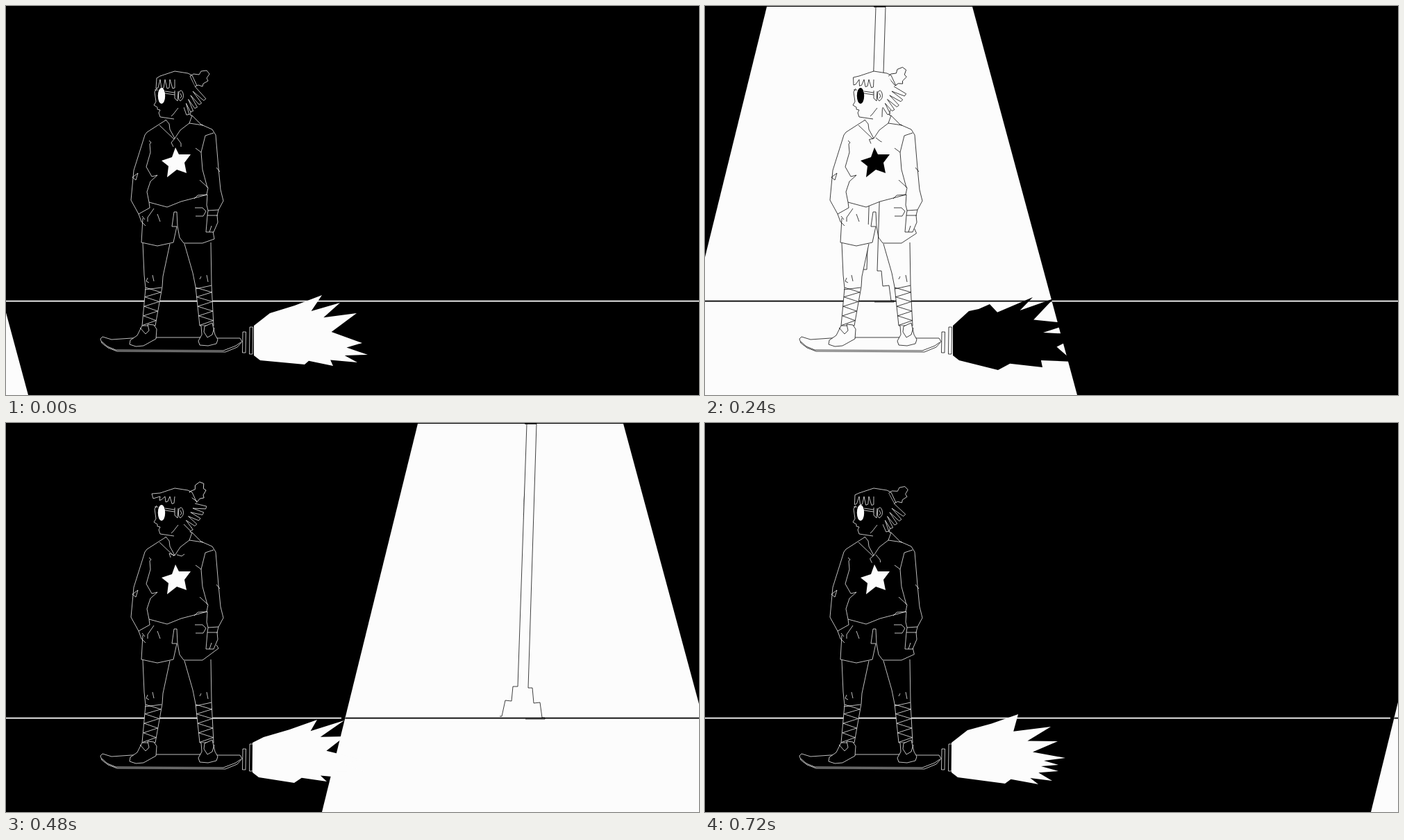
Recreate the animation shown at these times as an HTML page. Size 998x561 px, loop 760 ms.

```html
<!DOCTYPE html>
<html lang="en">
<head>
<meta charset="utf-8">
<title>Rocket board</title>
<style>
html, body { margin: 0; width: 100%; height: 100%; overflow: hidden; background: #000; }
svg { display: block; width: 100%; height: 100%; }
.ink { fill: none; stroke: #fcfcfc; stroke-width: .75; stroke-linejoin: round; }
.solid { fill: #000; }
.mask { fill: #000; stroke: none; }
.white { fill: #fcfcfc; stroke: none; }
#beam { fill: #fcfcfc; mix-blend-mode: difference; }
</style>
</head>
<body>
<svg viewBox="0 0 998 561" preserveAspectRatio="none">
  <rect width="998" height="561"/>
  <rect class="white" y="424.7" width="998" height="1.8"/>
  <rect id="gap" class="mask" y="424" width="5" height="3"/>

  <g id="lamp" class="ink">
    <path d="M78 1 65 380H58L56 401 47 400 42 423H39M92 1 80 382H86L88 404 97 403 100 425H104V427H76M75 1.5H92"/>
    <path class="white" d="M74.8 86 72.5 140 74 112Z"/>
  </g>

  <g class="ink">
    <!-- board -->
    <path class="solid" d="M136 480 139 477 152 481 181 479 216 478H279L305 479 337 479 340 484 333 492 316 499 160 498 147 493 138 486Z"/>
    <path d="M138 484 146 491 158 496 313 497 331 490 338 485"/>

    <!-- legs -->
    <path class="solid" d="M197 342 199 388 201 407 196 461H215L225 405 226 390 236 343"/>
    <path class="solid" d="M257 343 269 385 273 405 279 461H299L296 403 295 341"/>
    <path d="M204 392 202 397 206 399M211 388 213 397M281 390 279 394M289 388 291 398"/>
    <path id="laces"/>

    <!-- shoes -->
    <path class="solid" d="M196 461 189 475 179 482 178 488 187 491 198 490 216 480 217 466 213 460 204 459 206 468 201 473 193 464"/>
    <path class="solid" d="M281 461 282 474 277 483 279 489 291 490 303 487 305 481 301 474 297 457 286 462 285 470 290 478 297 474 300 464"/>

    <!-- shorts and hands -->
    <path class="solid" d="M197 306 195 341 218 346 241 341 246 318H239L242 297H246L247 318"/>
    <path id="hem"/>
    <path d="M204 311V305L213 292M218 300 222 311M272 291H283L288 296 284 303H273"/>
    <path class="solid" d="M291 295 290 302 288 326H299L305 312 304 302 306 294M290 302H305M296 317 293 326"/>
    <path d="M191 300 195 311 201 317M196 303 200 308"/>

    <!-- hoodie -->
    <path class="solid" d="M231 164 203 182 200 186 184 237 180 280 191 300 207 291 206 283 232 290 252 282 290 272 289 287 291 295 306 294 313 281 309 265 306 234 302 186 297 178 281 171 268 158"/>
    <path d="M206 194 209 197 207 199 208 211 202 232 210 246 218 244 208 253 203 268 206 283M182 247 190 241 187 251ZM271 278 276 273 289 272 291 262 279 251M303 233 308 239M299 183 287 187 281 211 283 236 290 262M273 205 281 211"/>
    <path d="M230 164 235 170 236 178 243 191 251 179 264 169 268 158 265 157 267 150M221 172 242 192M264 169 284 172"/>
    <path id="cords"/>

    <!-- head -->
    <path id="bun" class="solid" d="M265 101 270 98 278 99 281 94 289 93 293 98 289 104 291 108 284 112 283 116 277 114 272 116Z"/>
    <path id="back" class="solid"/>
    <path class="mask" d="M217 121 222 101 243 94 262 97 272 116 247 163 222 160Z"/>
    <path d="M222 101 243 94 262 97 268 100 275 115M217 119 214 124 216 138 213 143 218 146V149L222 150 220 154 222 160 242 163M238 159 241 156 248 147M214 121H219M229 123 243 125M229 126 243 128M243 122V133L247 137 248 123"/>
    <path d="M249 124Q253 119 255 126T251 137Q247 135 249 124M251 126 253 130 251 133"/>
    <path id="fringe"/>
    <ellipse class="white" cx="224" cy="129.500" rx="5.200" ry="11.500"/>
    <path class="white" d="M244 204 249 214H266L257 226 260 241 246 236 232 247 234 231 224 223 239 218Z"/>
    <path id="nozzle"/>
  </g>

  <path id="beam" d="M-415 1H-119L32 561H-553Z"/>
  <path id="flame"/>
</svg>

<script>
const STEP = 40, COUNT = 19, SPEED = 84;
const el = id => document.getElementById(id);
const mix = (a, b, k) => a + (b - a) * k;
const move = (id, x) => el(id).setAttribute("transform", `translate(${x} 0)`);
const line = pts => "M" + pts.map(p => p.map(v => v.toFixed(1)).join(" ")).join("L");
const trace = (id, ...lines) => el(id).setAttribute("d", lines.map(line).join(""));

// Crossed bands between the two edges of a shin
function lace(top, bottom, width, foot) {
  const row = (i, side) => [mix(top, bottom, i / 8) + side * mix(width, foot, i / 8), 406 + i * 6.8];
  return Array.from({ length: 9 }, (_, i) => row(i, i % 2));
}

// Locks at the back of the head, fanned out and lifted by the wind
function locks(k) {
  const pts = [];
  for (let i = 0; i < 5; i++) {
    const t = i / 4, a = mix(mix(.9, 1.4, t), mix(.3, 1.05, t), k);
    const x = 272 - 13 * t, y = 117 + 23 * t, c = Math.cos(a), s = Math.sin(a);
    const len = mix(23, 17, Math.max(t, k));
    for (const w of [2, -2]) pts.push([x + len * c + w * s, y + len * s - w * c]);
    pts.push([x - 3, y + 6]);
  }
  return [[272, 116], ...pts];
}

function fringe(k) {
  const pts = [[222, 101], [217 - 7 * k, 104 - 2 * k]];
  for (let i = 0; i < 4; i++) {
    const x = 216 + 8 * i - k * (4 - i), y = 119 - k * (10 - 2.5 * i);
    pts.push([x, y], [x + 3, y - 1], [222 + 7 * i, 106]);
  }
  return pts;
}

// Only the tips of the spikes; the notches between them follow by rule
const tips = [
  "380 443 455 417 481 428 505 443 513 486 521 503 506 514 471 519 430 517",
  "378 443 451 420 498 438 508 459 519 483 509 493 509 502 500 516 480 521 432 520",
  "373 453 450 428 489 429 490 452 513 485 517 503 483 511 464 517 417 519",
  "378 440 408 430 470 420 500 422 525 458 539 474 529 513 484 521 420 525"
].map(s => s.match(/\d+ \d+/g).map(p => p.split(" ").map(Number)));

function flame(spikes, x) {
  const pts = [[x, 461]];
  spikes.forEach(([px, py], i) => {
    if (i) {
      const [qx, qy] = spikes[i - 1], mx = (px + qx) / 2, my = (py + qy) / 2;
      const pull = i < 2 ? .04 : my < 475 ? .29 : .18;
      pts.push([mix(mx, 370, pull), mix(my, 483, pull)]);
    }
    pts.push([px, py]);
  });
  return [...pts, [x + 9, 511], [x, 504], [x, 461]];
}

const slab = (x, y, w, h) => [[x, y], [x + w, y], [x + w - .5, y + h], [x - .5, y + h], [x, y]];
const nozzles = [
  [slab(341, 470, 4.5, 30), slab(351, 463, 4.5, 39)],
  [slab(338, 480, 3.5, 9), slab(346, 466, 4, 34), slab(352, 462, 4, 41)],
  [slab(340, 476, 3.5, 19), slab(347.5, 467, 4.5, 34)]
];

function draw(n) {
  const x = n * SPEED, two = n >> 1;
  move("beam", x);
  move("lamp", x - 336);
  move("gap", x - 525);

  const k = n <= 12 ? n / 12 : (COUNT - n) / 7, hem = Math.min(1, k * 1.5);
  el("bun").setAttribute("transform", `rotate(${-30 * k} 269 108)`);
  trace("back", locks(k));
  trace("fringe", fringe(k));
  trace("cords", [[241 - 4 * k, 203 - 9 * k], [238 - 3 * k, 197 - 9 * k], [243, 191]],
    [[246, 190], [252 + k, 198 - 6 * k], [252 + 5 * k, 203 - 14 * k]]);
  trace("hem", [[247, 318], [250, 334], [256, 342], [283, 342],
    [300 + 6 * hem, 336 - 11 * hem], [298 + 5 * hem, 325 - 5 * hem]]);

  trace("nozzle", ...(n === 10 ? [] : nozzles[two % 3]));
  const kind = two % 4;
  trace("flame", flame(tips[kind], kind % 2 ? 355 : 357));
  move("flame", (n < 7 ? 0 : -2) + (kind % 2 ? 2 : 0));
  el("flame").setAttribute("fill", n >= 6 && n <= 10 ? "#000" : "#fcfcfc");
}

trace("laces", lace(201, 197, 23, 18), [[200, 409], [224, 406]],
  lace(273, 279, 23, 20), [[273, 408], [296, 403]]);

const start = performance.now();
function tick(now) {
  draw(Math.floor(Math.max(0, now - start) / STEP) % COUNT);
  requestAnimationFrame(tick);
}
draw(0);
requestAnimationFrame(tick);
</script>
</body>
</html>
```
